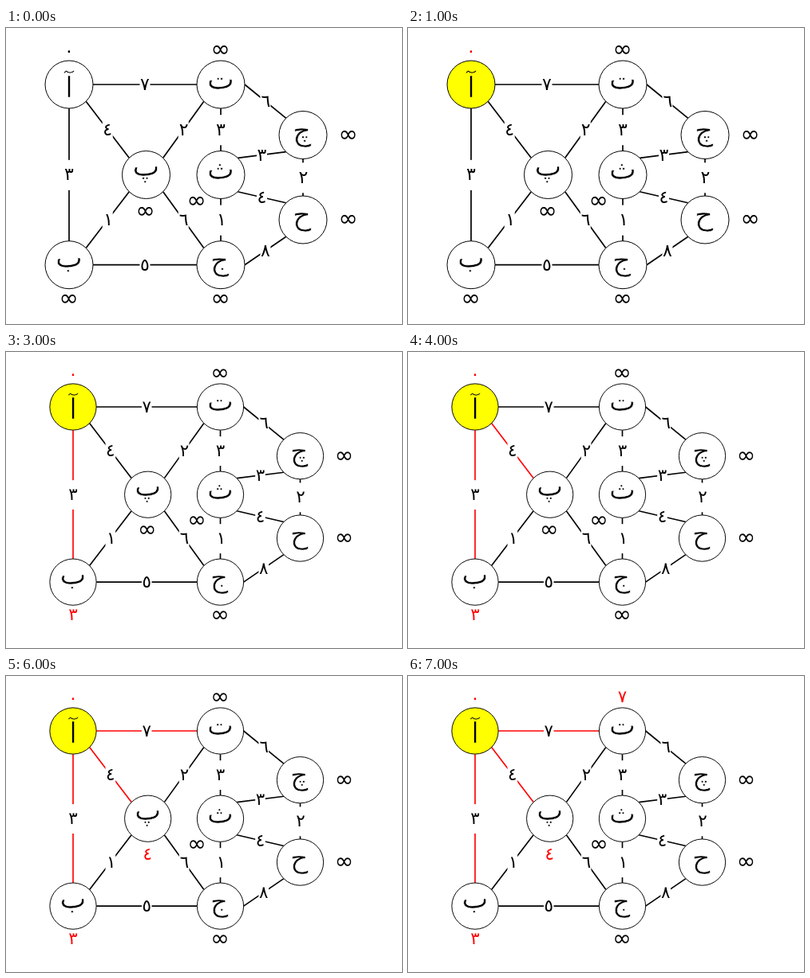
Write an HTML page with a canvas that moves like this. It is 496 px wide and 372 px high and loops after 8000 ms.

```html
<!DOCTYPE html>
<html lang="fa">
<head>
<meta charset="utf-8">
<title>Shortest paths</title>
<style>
html, body { margin: 0; width: 100%; height: 100%; overflow: hidden; background: #fff; }
canvas { display: block; }
</style>
</head>
<body>
<canvas id="stage" width="496" height="372"></canvas>
<script>
const ctx = document.getElementById('stage').getContext('2d');
const STEP = 1000, STEPS = 8, RADIUS = 30, DIAGONAL = RADIUS * Math.SQRT1_2;
const FONT = '"DejaVu Sans", sans-serif';

// letter, centre, letter drop, distance label position, [distance, step at which it is known]
const nodes = {
  a: ['آ', 79, 71, -2, 79, 29, ['٠', 0]],
  b: ['ب', 79, 297.7, 0, 79, 340, ['٣', 3]],
  p: ['پ', 175.5, 184.5, 0, 175, 230, ['٤', 5]],
  t: ['ت', 269, 71, -2, 269, 27, ['٧', 7]],
  s: ['ث', 269, 184.5, -4, 239, 217],
  j: ['ج', 269, 297.7, 3, 269, 340],
  c: ['چ', 372, 134.5, 3, 429, 134],
  h: ['ح', 372, 241, 3, 429, 240]
};

// from, anchor direction, to, anchor direction, weight, step at which it turns red
const edges = [
  ['a', 1, 0, 't', -1, 0, '٧', 6],
  ['a', 1, 1, 'p', -1, -1, '٤', 4],
  ['a', 0, 1, 'b', 0, -1, '٣', 2],
  ['b', 1, -1, 'p', -1, 1, '١'],
  ['b', 1, 0, 'j', -1, 0, '٥'],
  ['p', 1, -1, 't', -1, 1, '٢'],
  ['p', 1, 1, 'j', -1, -1, '٦'],
  ['t', 0, 1, 's', 0, -1, '٣'],
  ['s', 0, 1, 'j', 0, -1, '١'],
  ['t', 1, 0, 'c', -1, -1, '٦'],
  ['s', 1, -1, 'c', -1, 1, '٣'],
  ['s', 1, 1, 'h', -1, -1, '٤'],
  ['c', 0, 1, 'h', 0, -1, '٢'],
  ['j', 1, 0, 'h', -1, 1, '٨']
];

// Draws text with its ink centred on the given point; a thinning colour trims its outline.
function centred(text, x, y, size, color = '#000', thinning) {
  ctx.font = `${size}px ${FONT}`;
  ctx.fillStyle = color;
  const m = ctx.measureText(text);
  const left = x + (m.actualBoundingBoxLeft - m.actualBoundingBoxRight) / 2;
  const base = y + (m.actualBoundingBoxAscent - m.actualBoundingBoxDescent) / 2;
  ctx.fillText(text, left, base);
  if (thinning) {
    ctx.strokeStyle = thinning;
    ctx.lineWidth = 0.7;
    ctx.strokeText(text, left, base);
  }
}

const digit = (text, x, y, color) => centred(text, x, y, 22, color);

function anchor(key, dx, dy) {
  const reach = dx && dy ? DIAGONAL : RADIUS;
  return [nodes[key][1] + dx * reach, nodes[key][2] + dy * reach];
}

function drawEdge([from, fx, fy, to, tx, ty, weight, redAt = Infinity], step) {
  const [x1, y1] = anchor(from, fx, fy), [x2, y2] = anchor(to, tx, ty);
  const x = (x1 + x2) / 2, y = (y1 + y2) / 2;
  ctx.strokeStyle = step >= redAt ? '#f00' : '#000';
  ctx.lineWidth = 1.7;
  ctx.beginPath();
  ctx.moveTo(x1, y1);
  ctx.lineTo(x2, y2);
  ctx.stroke();
  ctx.fillStyle = '#fff';
  ctx.fillRect(x - 6.5, y - 18.5, 13, 38);
  digit(weight, x, y);
}

function drawNode([letter, x, y, drop, labelX, labelY, known], step, active) {
  const fill = active ? '#ff0' : '#fff';
  ctx.beginPath();
  ctx.arc(x, y, RADIUS, 0, Math.PI * 2);
  ctx.fillStyle = fill;
  ctx.fill();
  ctx.strokeStyle = '#000';
  ctx.lineWidth = 1;
  ctx.stroke();
  centred(letter, x, y + drop, 36, '#000', fill);
  if (known && step >= known[1]) {
    digit(known[0], labelX, labelY, step ? '#f00' : '#000');
  } else {
    centred('∞', labelX, labelY, 29);
  }
}

function draw(now) {
  const step = Math.floor(now / STEP) % STEPS;
  ctx.setTransform(1, 0, 0, 1, 0, 0);
  ctx.fillStyle = '#fff';
  ctx.fillRect(0, 0, 496, 372);
  // The figure shrinks slightly once the first distance is found.
  if (step >= 3) {
    ctx.translate(84, 69);
    ctx.scale(0.971, 0.971);
    ctx.translate(-79, -71);
  }
  edges.forEach(edge => drawEdge(edge, step));
  for (const key in nodes) drawNode(nodes[key], step, key === 'a' && step >= 1);
}

const start = performance.now();
function tick() {
  draw(performance.now() - start);
  requestAnimationFrame(tick);
}
tick();
</script>
</body>
</html>
```
